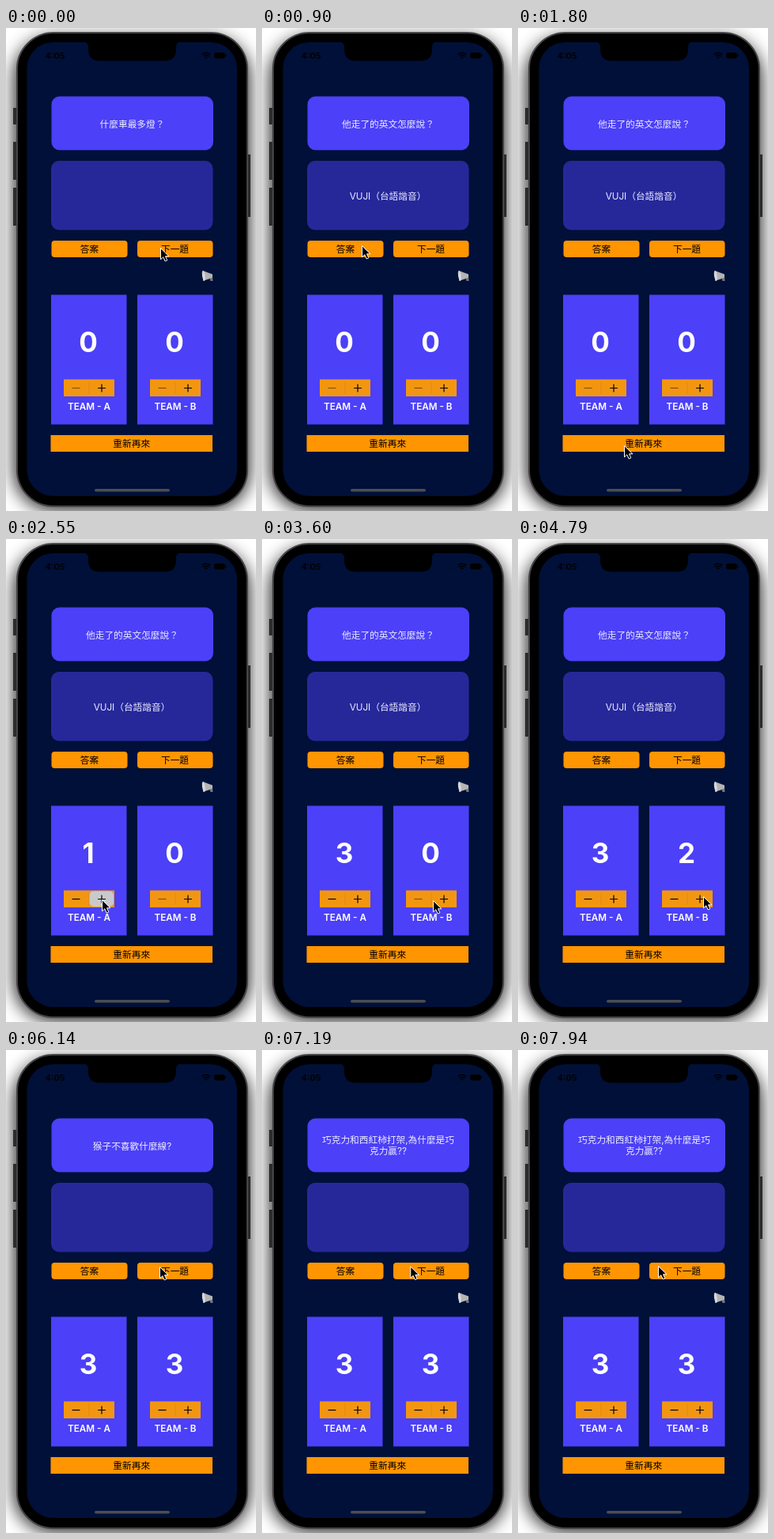
An HTML page for the animation above (8000 ms loop, 316 by 611 pixels).

```html
<!DOCTYPE html>
<html lang="zh-Hant">
<head>
<meta charset="utf-8">
<style>
html, body { margin: 0; height: 100%; overflow: hidden; background: #fff; }
svg { display: block; width: 316px; height: 611px; }
text { font: 11.7px Inter, "Noto Sans CJK TC", "Noto Sans CJK", sans-serif; text-anchor: middle; }
.light { fill: #fff; }
.quiz { fill: #ececff; }
.score { font-size: 35px; font-weight: 700; }
.team { font-size: 11.7px; font-weight: 600; }
.clock { font-size: 11px; font-weight: 600; }
</style>
</head>
<body>
<svg viewBox="0 0 316 611">
  <defs>
    <filter id="blur" x="-20%" y="-20%" width="140%" height="140%"><feGaussianBlur stdDeviation="11"/></filter>
    <g id="panel">
      <path fill="#4c40f8" d="M0 337.500h95.500v164h-95.500z"/>
      <path fill="#f29612" d="M16 444.500h64v21.500h-64z"/>
      <path stroke="#d98a1c" d="M48 448v15"/>
      <path stroke="#000" stroke-width="1.200" d="M59 455.500h10m-5-5v10"/>
    </g>
  </defs>

  <!-- phone -->
  <rect x="10" y="12" width="298" height="598" rx="50" opacity=".85" filter="url(#blur)"/>
  <path fill="#2c2c2e" d="M9 101h5v21h-5zM9 144h5v48h-5zM9 202h5v48h-5zM304 160h5v79h-5z"/>
  <rect x="14" y="6" width="291" height="599" rx="46" stroke="#454547" stroke-width="2"/>
  <rect x="26.500" y="18" width="265.500" height="574" rx="33" fill="#001038"/>
  <path d="M99 17.500h121q-5 1-5 6v3q0 15-14 15h-83q-14 0-14-15v-3q0-5-5-6z"/>
  <text class="clock" x="62" y="39">4:05</text>
  <g fill="none" stroke="#000" stroke-width="1.600">
    <path d="M247.500 33.500q5.500-4.500 11 0M249.500 35.800q3.500-3 7 0M251.500 38q1.500-1.500 3 0"/>
    <rect x="263.500" y="31.500" width="13" height="6.500" rx="2" fill="#000" stroke-width="1"/>
    <path d="M278.300 33.500v2.500" stroke-width="1"/>
    <path d="M234 37h7" stroke-dasharray="1 1" stroke-width="1" opacity=".6"/>
  </g>
  <rect x="112" y="583" width="95" height="3.500" rx="1.700" fill="#4c4c50"/>

  <!-- quiz -->
  <rect x="57.500" y="86.500" width="204.500" height="68" rx="10" fill="#4c40f8"/>
  <rect x="57" y="168" width="204.500" height="87.500" rx="10" fill="#26289a"/>
  <g fill="#ff9500">
    <rect x="57.500" y="269" width="96" height="21" rx="4"/>
    <rect x="166" y="269" width="95.500" height="21" rx="4"/>
    <path d="M56.500 515h204.500v21h-204.500z"/>
  </g>
  <text x="105.500" y="284">答案</text>
  <text x="213.500" y="284">下一題</text>
  <text x="158.700" y="530">重新再來</text>
  <text id="line1" class="quiz" x="159.500"></text>
  <text id="line2" class="quiz" x="159.500" y="132"></text>
  <text id="answer" class="quiz" x="159" y="216.500">VUJI（台語諧音）</text>

  <!-- megaphone -->
  <path fill="#77777a" d="M256 315l5-1 .5 6h-3l-1-3-3 1z"/>
  <path fill="#b4b4b6" d="M249 307l12 4.500v4l-12 4.500z"/>
  <ellipse cx="249.800" cy="313.500" rx="1.800" ry="6.500" fill="#d8d8da" transform="rotate(-8 249.800 313.500)"/>

  <!-- teams -->
  <use href="#panel" x="57"/>
  <use href="#panel" x="166"/>
  <g id="press" stroke="#000" stroke-width="1.200">
    <rect x="48.500" y="445.500" width="30.500" height="19.500" rx="5" fill="#c9c9cc" stroke="none"/>
    <path d="M59 455.500h10m-5-5v10"/>
  </g>
  <g stroke="#000" stroke-width="1.200">
    <path id="minusA" d="M83.500 455.500h10"/>
    <path id="minusB" d="M192.500 455.500h10"/>
  </g>
  <g class="light">
    <text id="scoreA" class="score" x="104" y="410"></text>
    <text id="scoreB" class="score" x="213" y="410"></text>
    <text class="team" x="105" y="483">TEAM - A</text>
    <text class="team" x="214" y="483">TEAM - B</text>
  </g>

  <path id="cursor" stroke="#fff" stroke-linejoin="round" d="M.5.5v14.300l3.300-3 2.400 5.200 2.600-1.200-2.300-5h4.500z"/>
</svg>
<script>
const LOOP = 8000, STEP = 150;
const $ = id => document.getElementById(id);
const set = (id, name, value) => $(id).setAttribute(name, value);

const questions = [
  ["什麼車最多燈？"],
  ["他走了的英文怎麼說？"],
  ["猴子不喜歡什麼線?"],
  ["巧克力和西紅柿打架,為什麼是巧", "克力贏??"]
];
// Times of the taps on each button
const nextTaps = [150, 6140, 6890];
const answerTap = 900;
const teams = [
  { name: "A", x: 57, taps: [2550, 3000, 3300] },
  { name: "B", x: 166, taps: [4050, 4640, 5390] }
];
const home = [195, 278];
const moves = [
  { start: 450, time: 450, to: [126, 275] },
  { start: 1500, time: 450, to: [134, 528] },
  { start: 1950, time: 450, to: [121, 456] },
  { start: 3450, time: 300, to: [216, 457] },
  { start: 3750, time: 300, to: [234, 452] },
  { start: 5690, time: 450, to: [194, 274] },
  { start: 6890, time: 1050, to: [177, 273] }
];

const count = (taps, t) => taps.filter(tap => tap <= t).length;
const smooth = p => p * p * (3 - 2 * p);

// The pointer advances in whole steps, the first one at the start of a move.
function pointer(t) {
  return moves.filter(m => m.start <= t).reduce((from, { start, time, to }) => {
    const steps = Math.floor((t - start) / STEP) + 1;
    const p = smooth(Math.min(1, steps * STEP / time));
    return from.map((v, i) => v + (to[i] - v) * p);
  }, home);
}

function draw(t) {
  const asked = count(nextTaps, t);
  const [top, bottom = ""] = questions[asked];
  $("line1").textContent = top;
  set("line1", "y", bottom ? 118 : 126);
  $("line2").textContent = bottom;
  set("answer", "opacity", asked === 1 && t >= answerTap ? 1 : 0);

  set("press", "opacity", 0);
  for (const { name, x, taps } of teams) {
    const score = count(taps, t);
    $("score" + name).textContent = score;
    set("minus" + name, "opacity", score ? 1 : .45);
    if (score && t < taps[score - 1] + STEP) {
      set("press", "opacity", 1);
      set("press", "transform", `translate(${x})`);
    }
  }
  set("cursor", "transform", `translate(${pointer(t)})`);
}

const begin = performance.now();
function tick() {
  draw((performance.now() - begin) % LOOP);
  requestAnimationFrame(tick);
}
tick();
</script>
</body>
</html>
```
